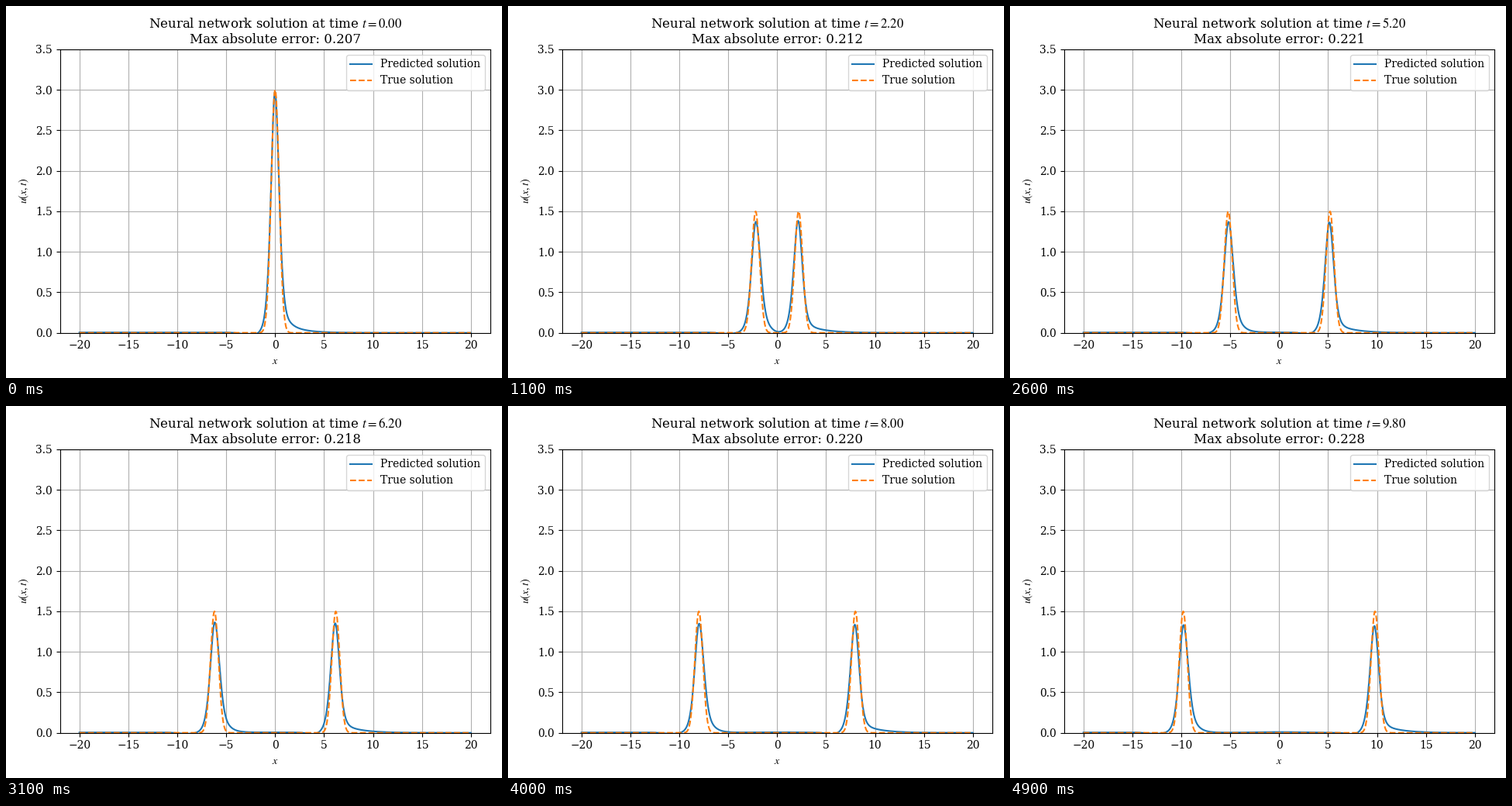
A matplotlib script that plays this animation: 640x480 px, repeating every 5000 ms.

```python
import matplotlib.pyplot as plt
import numpy as np
from matplotlib.animation import FuncAnimation

FRAMES = 50
INTERVAL = 100
TIME_STEP = 0.2

plt.rcParams.update({
    "font.family": "DejaVu Serif",
    "mathtext.fontset": "stix",
})

x = np.linspace(-20, 20, 1000)

# Time, peak of the left wave, peak of the right wave, largest error
KEY_TIMES = [2.2, 3.6, 5.2, 7.2, 8.8, 9.8]
LEFT_PEAKS = [1.355, 1.370, 1.367, 1.357, 1.338, 1.330]
RIGHT_PEAKS = [1.358, 1.357, 1.355, 1.335, 1.322, 1.313]
ERROR_TIMES = [0] + KEY_TIMES
ERRORS = [0.207, 0.212, 0.223, 0.221, 0.216, 0.223, 0.228]


def sigmoid(z):
    return 1 / (1 + np.exp(-np.clip(z, -60, 60)))


def bump(s, center, width):
    return np.exp(-((s - center) / width) ** 2)


def hump(s, left_rate, right_rate):
    """Squared sech with its own steepness on each side."""
    rate = np.where(s < 0, left_rate, right_rate)
    return 1 / np.cosh(rate * s) ** 2


def tail(s, height, start, steepness, length):
    s_pos = np.maximum(s, 0)
    return height * sigmoid(steepness * (s - start)) * np.exp(-s_pos / length)


def true_solution(t):
    return 1.5 * (np.exp(-3 * (x - t) ** 2) + np.exp(-3 * (x + t) ** 2))


def predicted_solution(t):
    early = np.exp(-t)
    sharpen = 1 + 0.12 * early
    left_peak = np.interp(t, KEY_TIMES, LEFT_PEAKS) + 0.14 * early
    right_peak = np.interp(t, KEY_TIMES, RIGHT_PEAKS) + 0.14 * early

    sl = x + t - 0.03
    left = (left_peak * hump(sl, 1.65 * sharpen, 1.5 * sharpen)
            + tail(sl, 0.33, 1.4, 4, 0.8)
            - 0.012 * bump(sl, -2.8, 1.2))

    sr = x - t + 0.06
    right = (right_peak * hump(sr, 1.65 * sharpen, 1.7 * sharpen)
             + tail(sr, 0.15, 1.0, 3, 1.85)
             - 0.02 * bump(sr, -2.2, 0.9))

    drift = 0.005 * sigmoid(-3 * (sl + 4)) + 0.001 * t * bump(x, 0, 4.5)
    return left + right + drift


def title_text(t):
    error = np.interp(t, ERROR_TIMES, ERRORS)
    return (f"Neural network solution at time $t = {t:.2f}$\n"
            f"Max absolute error: {error:.3f}")


fig, ax = plt.subplots(figsize=(6.4, 4.8), dpi=100)
predicted_line, = ax.plot(x, predicted_solution(0), label="Predicted solution")
true_line, = ax.plot(x, true_solution(0), "--", label="True solution")
title = ax.set_title(title_text(0))
ax.set_xlabel("$x$")
ax.set_ylabel("$u(x, t)$")
ax.set_xlim(-22, 22)
ax.set_ylim(0, 3.5)
ax.grid(True)
ax.legend(loc="upper right")
fig.tight_layout()


def update(frame):
    t = frame * TIME_STEP
    predicted_line.set_ydata(predicted_solution(t))
    true_line.set_ydata(true_solution(t))
    title.set_text(title_text(t))
    return predicted_line, true_line, title


animation = FuncAnimation(fig, update, frames=FRAMES, interval=INTERVAL,
                          repeat=True, repeat_delay=0, blit=False)

plt.show()
```
